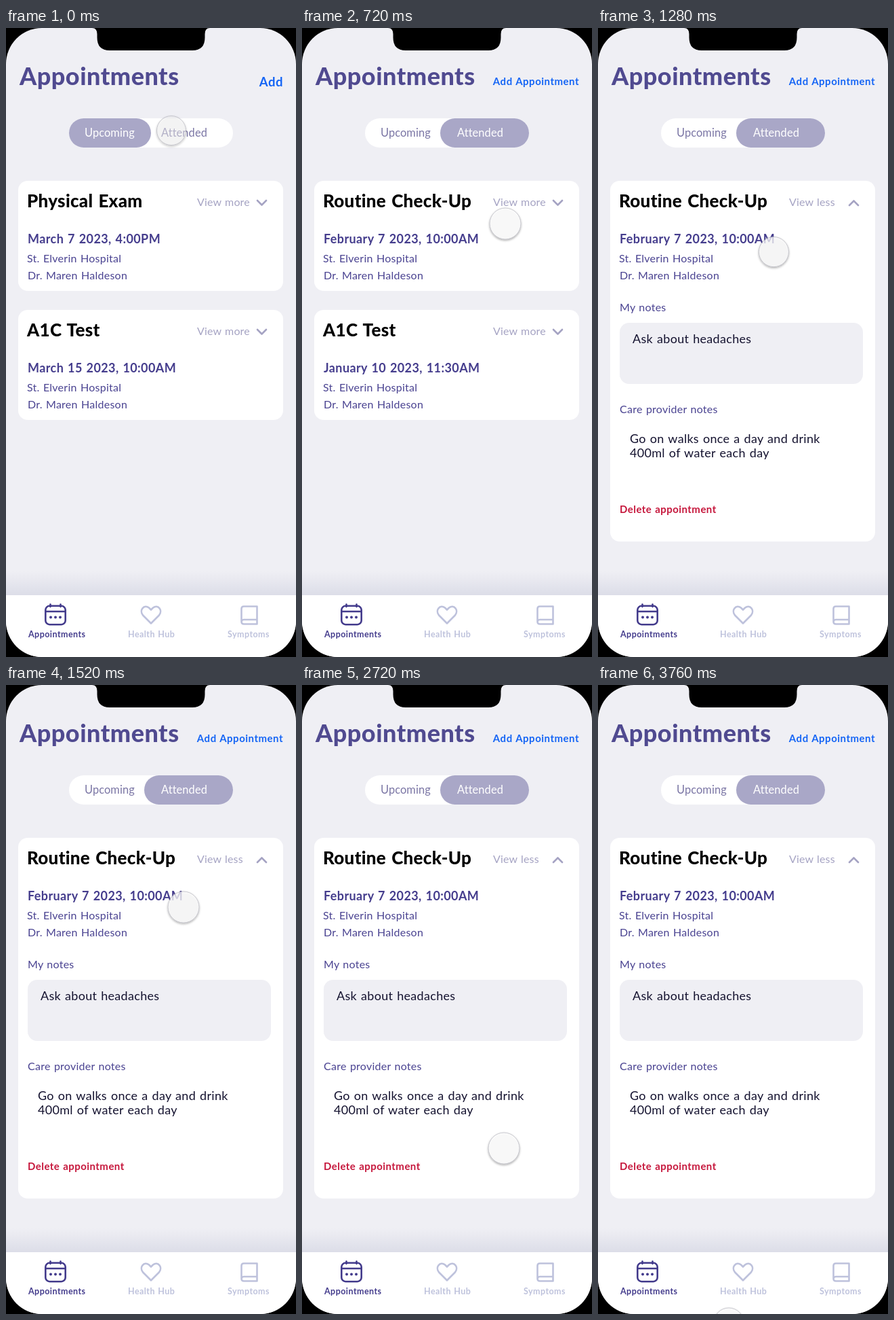
An HTML page for the animation above (3.84 s loop, 428 by 926 pixels).

```html
<!DOCTYPE html>
<html lang="en">
<head>
<meta charset="utf-8">
<title>Appointments</title>
<style>
  html, body { margin: 0; height: 100%; overflow: hidden; background: #000; }
  svg { display: block; width: 428px; height: 926px; font-family: Lato, sans-serif; }
  text { word-spacing: .06em; white-space: pre; }
  .title { font-size: 36px; font-weight: 800; letter-spacing: .5px; fill: #504a90; }
  .add { font-weight: 700; letter-spacing: .5px; fill: #1565f5; text-anchor: end; }
  .tab { font-size: 16.4px; letter-spacing: .1px; fill: #7b76a5; }
  .tab.on { fill: #fff; }
  .head { font-size: 26px; font-weight: 800; letter-spacing: .3px; }
  .more { font-size: 16px; letter-spacing: .15px; fill: #a5a3c3; }
  .date { font-size: 18px; font-weight: 700; letter-spacing: .4px; fill: #453d8d; }
  .info { font-size: 16px; letter-spacing: .25px; fill: #4a4391; }
  .note { font-size: 18px; letter-spacing: .3px; fill: #14122f; }
  .delete { font-size: 15px; font-weight: 700; letter-spacing: .45px; fill: #c6173c; }
  .nav { font-size: 12.5px; font-weight: 700; letter-spacing: .45px; }
  .icon { fill: none; stroke-width: 2.6; stroke-linecap: round; stroke-linejoin: round; }
</style>
</head>
<body>
<svg viewBox="0 0 428 926">
  <defs>
    <linearGradient id="fade" x2="0" y2="1">
      <stop stop-color="#dcdde8" stop-opacity="0"/>
      <stop offset="1" stop-color="#dcdde8"/>
    </linearGradient>
    <filter id="shadow" x="-30%" y="-30%" width="160%" height="160%">
      <feDropShadow dx="0" dy="1.5" stdDeviation="1.5" flood-color="#000" flood-opacity=".4"/>
    </filter>
    <clipPath id="phone"><rect width="428" height="926" rx="53"/></clipPath>
  </defs>

  <g clip-path="url(#phone)">
    <rect width="428" height="926" fill="#efeff4"/>
    <text class="title" x="20" y="84">Appointments</text>
    <rect x="93" y="133" width="242" height="43" rx="21.5" fill="#fff"/>
    <g id="screens"></g>

    <rect y="800" width="428" height="35" fill="url(#fade)"/>
    <rect y="835" width="428" height="91" fill="#fff"/>
    <g fill="#433b8c">
      <g class="icon" stroke="#433b8c">
        <rect x="58.3" y="850.8" width="29.4" height="27.4" rx="6"/>
        <path d="M58.5 859H87.5M65.5 848.5V852M80.5 848.5V852"/>
        <path d="M66 867.5h.01M73 867.5h.01M80 867.5h.01" stroke-width="4"/>
      </g>
      <text class="nav" x="33" y="897">Appointments</text>
    </g>
    <g fill="#bec2dc">
      <g class="icon" stroke="#bec2dc" stroke-width="3">
        <path d="M214 876.5L202 864.5C196 857 204 848 211 853.5L214 856.5L217 853.5C224 848 232 857 226 864.5Z"/>
        <path d="M351 851.5H370.5V877.5H351Q347.5 877.5 347.5 874V855Q347.5 851.5 351 851.5ZM348 873Q348.5 871 351 871H370"/>
      </g>
      <text class="nav" x="180" y="897">Health Hub</text>
      <text class="nav" x="327" y="897">Symptoms</text>
    </g>
    <circle id="touch" fill="#fff" stroke="#b4b4bc" stroke-width=".7" filter="url(#shadow)"/>
  </g>
  <path d="M127 0Q134.500 0 134.500 9V14Q134.500 33 153 33H275Q293.500 33 293.500 14V9Q293.500 0 301 0Z"/>
</svg>

<script>
const LOOP = 3840, STEP = 80;
const ATTENDED_AT = 160, EXPANDED_AT = 1280;

// time, x, y, radius, opacity
const touchPath = [
  [0, 244, 151, 21.5, .4],
  [160, 244, 152, 22, .5],
  [720, 300, 288, 23, .8],
  [1120, 258, 331, 21.5, .7],
  [1520, 262, 327, 23, .7],
  [2080, 321, 532, 23, .8],
  [2720, 298, 682, 23, .8],
  [3760, 193, 939, 22, .8]
];

const text = (style, x, y, words, extra = '') =>
  `<text class="${style}" x="${x}" y="${y}" ${extra}>${words}</text>`;

const box = (x, y, w, h, r, fill) =>
  `<rect x="${x}" y="${y}" width="${w}" height="${h}" rx="${r}" fill="${fill}"/>`;

function card(y, title, date, open = false) {
  const arrow = open ? 'M371 36L377.500 29.500L384 36' : 'M371 29L377.500 35.500L384 29';
  return `<g transform="translate(0 ${y})">` +
    box(18, 0, 391, open ? 531 : 162, 14, '#fff') +
    text('head', 31, 39, title) +
    text('more', 282, 37, open ? 'View less' : 'View more') +
    `<path class="icon" stroke="#a5a3c3" d="${arrow}"/>` +
    text('date', 32, 92, date) +
    text('info', 31, 120, 'St. Elverin Hospital') +
    text('info', 32, 145, 'Dr. Maren Haldeson') +
    (open ? details() : '') + '</g>';
}

const details = () =>
  text('info', 32, 192, 'My notes') +
  box(32, 209, 359, 90, 14, '#efeff4') +
  text('note', 51, 239, 'Ask about headaches') +
  text('info', 32, 342, 'Care provider notes') +
  text('note', 47, 386, 'Go on walks once a day and drink') +
  text('note', 47, 407, '400ml of water each day') +
  text('delete', 32, 489, 'Delete appointment');

const header = attended =>
  (attended ? text('add', 409, 84, 'Add Appointment', 'font-size="15"')
            : text('add', 409, 86, 'Add', 'font-size="18.5"')) +
  box(attended ? 204 : 93, 133, attended ? 131 : 121, 43, 21.5, '#a9a7c7') +
  text(attended ? 'tab' : 'tab on', 116, 160, 'Upcoming') +
  text(attended ? 'tab on' : 'tab', 229, 160, 'Attended');

const checkUp = open => card(225, 'Routine Check-Up', 'February 7 2023, 10:00AM', open);

const screens = [
  header(false) + card(225, 'Physical Exam', 'March 7 2023, 4:00PM') +
    card(415, 'A1C Test', 'March 15 2023, 10:00AM'),
  header(true) + checkUp(false) + card(415, 'A1C Test', 'January 10 2023, 11:30AM'),
  header(true) + checkUp(true)
];

const stage = document.getElementById('screens');
const touch = document.getElementById('touch');
stage.innerHTML = screens.map(s => `<g>${s}</g>`).join('');

function touchAt(t) {
  const i = touchPath.findIndex(p => p[0] > t);
  if (i < 0) return touchPath.at(-1);
  const a = touchPath[i - 1], b = touchPath[i];
  const u = (t - a[0]) / (b[0] - a[0]);
  const k = u * u * (3 - 2 * u);
  return a.map((v, j) => v + (b[j] - v) * k);
}

function draw(now) {
  const t = Math.floor(now % LOOP / STEP) * STEP;
  const current = (t >= ATTENDED_AT) + (t >= EXPANDED_AT);
  [...stage.children].forEach((g, i) => g.style.display = i === current ? '' : 'none');

  const [, x, y, r, alpha] = touchAt(t);
  touch.setAttribute('cx', x);
  touch.setAttribute('cy', y);
  touch.setAttribute('r', r);
  touch.setAttribute('fill-opacity', alpha);
}

let start;
function tick(now) {
  start ??= now;
  draw(now - start);
  requestAnimationFrame(tick);
}
draw(0);
requestAnimationFrame(tick);
</script>
</body>
</html>
```
